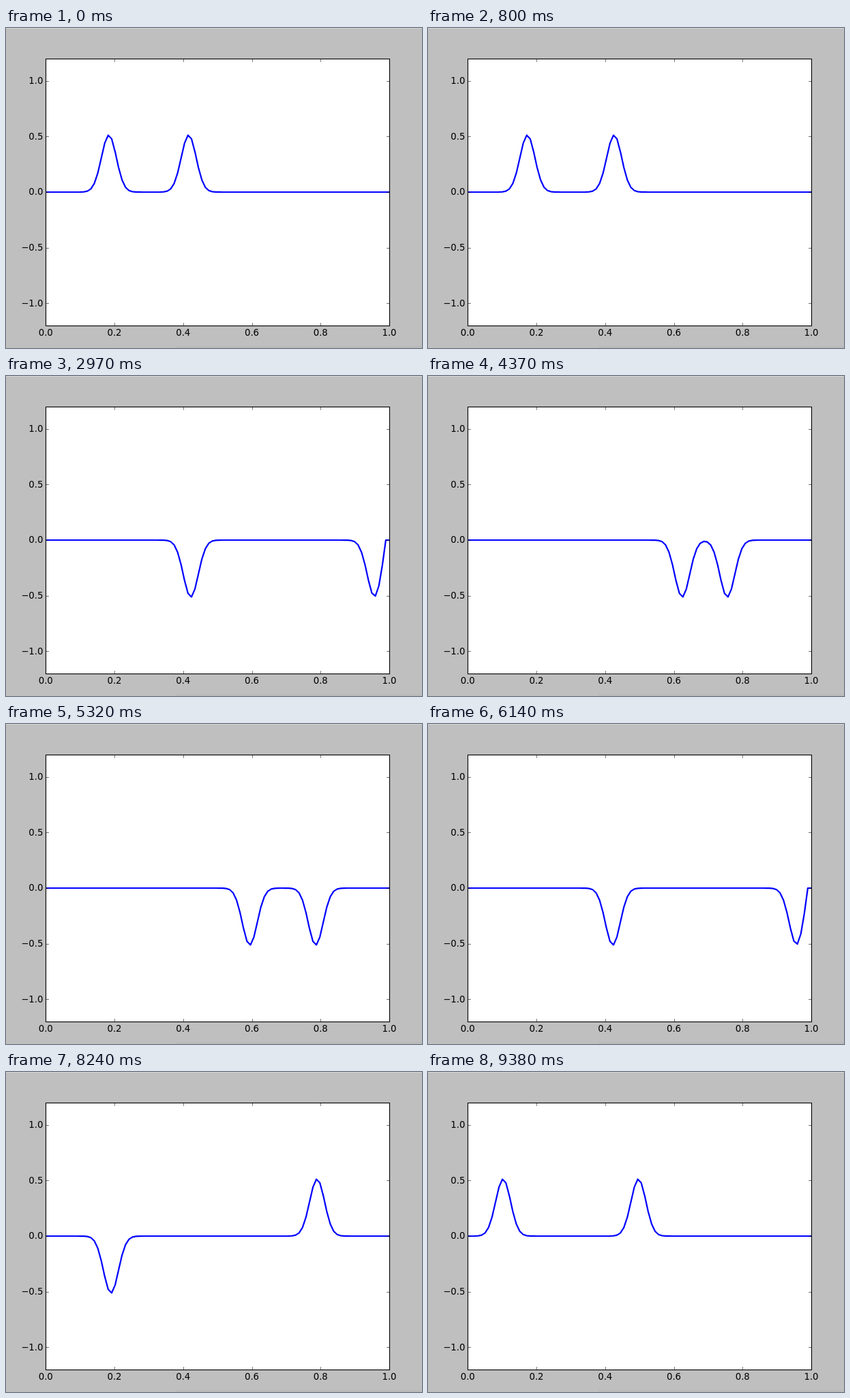
An HTML page with a canvas for the animation above (9540 ms loop, 610 px wide and 470 px high).

```html
<!DOCTYPE html>
<html lang="en">
<head>
<meta charset="utf-8">
<title>Wave on a string</title>
<style>
html, body { margin: 0; width: 100%; height: 100%; overflow: hidden; background: #bfbfbf; }
canvas { display: block; }
</style>
</head>
<body>
<canvas id="plot" width="610" height="470"></canvas>
<script>
const ctx = document.getElementById('plot').getContext('2d');
const LOOP = 9540, POINTS = 100, PERIOD = 196;
const px = x => 58.25 + 503.75 * x;
const py = y => 241 - 163.33 * y;
const snap = v => Math.floor(v + 0.5) + 0.5;

// Leapfrog solution of the wave equation, both ends held at zero.
const pulse = Array.from({ length: POINTS }, (_, i) => Math.exp(-1000 * (i / 99 - 0.3) ** 2));
const waves = [pulse, pulse];
while (waves.length < PERIOD) {
  const [before, now] = waves.slice(-2);
  waves.push(now.map((_, i) => i > 0 && i < 98 ? now[i - 1] + now[i + 1] - before[i] : 0));
}

// Stretches of running playback: start ms, end ms, redraws, first and last wave index.
// The picture holds still between them.
const runs = [
  [0, 70, 2, -11, -9], [70, 1020, 19, -9, 21], [1070, 1540, 10, 23, 38],
  [1540, 1660, 3, 38, 42], [1800, 2570, 15, 46, 70], [2970, 3130, 4, 72, 77],
  [3800, 4100, 6, 78, 86], [4240, 4560, 6, 88, 98], [4830, 5040, 5, 100, 107],
  [5320, 5640, 6, 108, 118], [5940, 5990, 2, 120, 122], [6140, 6200, 2, 125, 127],
  [6480, 6640, 4, 129, 134], [6890, 6950, 2, 135, 137], [7190, 7260, 2, 139, 141],
  [7640, 7740, 2, 144, 147], [8240, 8580, 6, 148, 155], [8770, 9380, 11, 157, 177]
];

function waveIndex(t) {
  const [start, end, redraws, first, last] = runs.filter(run => run[0] <= t).pop();
  const part = Math.min(1, (t - start) / (end - start));
  const step = Math.floor(part * (redraws - 1) + 1e-6);
  return Math.round(first + (last - first) * step / (redraws - 1));
}

function line(x1, y1, x2, y2) {
  ctx.beginPath();
  ctx.moveTo(x1, y1);
  ctx.lineTo(x2, y2);
  ctx.stroke();
}

function drawAxes() {
  const left = snap(px(0)), right = snap(px(1)), top = snap(py(1.2)), bottom = snap(py(-1.2));
  ctx.strokeStyle = ctx.fillStyle = '#000';
  ctx.lineWidth = 0.56;
  ctx.font = '13.33px "DejaVu Sans", sans-serif';
  ctx.textAlign = 'center';
  for (let i = 0; i <= 5; i++) {
    const x = px(i / 5);
    line(snap(x), bottom, snap(x), bottom - 4.4);
    line(snap(x), top, snap(x), top + 4.4);
    ctx.fillText((i / 5).toFixed(1), x, 452);
  }
  ctx.textAlign = 'right';
  for (let i = -2; i <= 2; i++) {
    const y = py(i / 2);
    line(left, snap(y), left + 4.4, snap(y));
    line(right, snap(y), right - 4.4, snap(y));
    ctx.fillText((i / 2).toFixed(1).replace('-', '\u2212'), 54.5, Math.round(y + 4.3));
  }
  ctx.lineWidth = 1.11;
  ctx.strokeRect(left, top, right - left, bottom - top);
}

function drawWave(wave) {
  ctx.save();
  ctx.beginPath();
  ctx.rect(58, 45, 504, 392);
  ctx.clip();
  ctx.strokeStyle = '#00f';
  ctx.lineWidth = 2.22;
  ctx.lineJoin = 'round';
  ctx.beginPath();
  wave.forEach((y, i) => ctx.lineTo(px(i / 99), py(y)));
  ctx.stroke();
  ctx.restore();
}

function rect(color, x, y, w, h) {
  ctx.fillStyle = color;
  ctx.fillRect(x, y, w, h);
}

function render() {
  const n = waveIndex(performance.now() % LOOP);
  rect('#bfbfbf', 0, 0, 610, 470);
  rect('#d8d8d8', 0, 0, 610, 1);
  rect('#bababa', 250, 467, 360, 3);
  rect('#fff', 58, 45, 504, 392);
  drawWave(waves[(n + PERIOD) % PERIOD]);
  drawAxes();
  requestAnimationFrame(render);
}
render();
</script>
</body>
</html>
```
